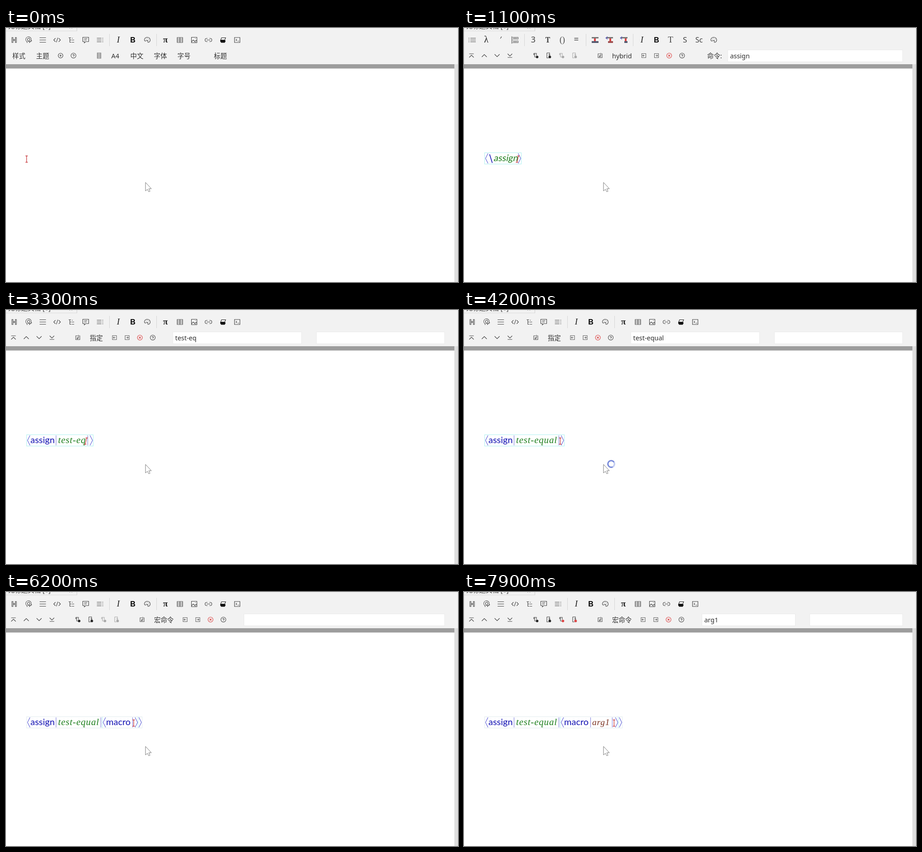
These frames come from a looping animation (998x561 px, 8 s). An HTML page with a canvas:

```html
<!DOCTYPE html>
<html lang="zh">
<meta charset="utf-8">
<style>
  html, body { margin: 0; width: 100%; height: 100%; overflow: hidden; background: #fff }
  canvas { display: block }
</style>
<canvas id="stage" width="998" height="561"></canvas>
<script>
const ctx = document.getElementById('stage').getContext('2d');
const INK = '#444', RED = '#dc4444', PALE = '#a8a8a8', BRACKET = '#5c5cd6', BLUE = '#1414b4', GREEN = '#208020';
const UI = '14.4px "Noto Sans", "Noto Sans CJK SC", sans-serif';
const SANS = '20px Lato, sans-serif';
const serif = (size, style = '') => `${style} ${size}px "Liberation Serif", serif`;

const EMPTY = 0, COMMAND = 1, NAME = 2, BODY = 3, SUBCOMMAND = 4, MACRO = 5, MACRO_ARG = 6;

// Typing steps: time in ms, editor mode, text typed so far.
const steps = [
  [0, EMPTY, ''],
  [500, COMMAND, ''], [600, COMMAND, 'a'], [700, COMMAND, 'as'], [800, COMMAND, 'ass'], [900, COMMAND, 'assi'], [1000, COMMAND, 'assign'],
  [1500, NAME, ''], [1900, NAME, 't'], [2000, NAME, 'te'], [2200, NAME, 'tet'], [2300, NAME, 'te'], [2400, NAME, 'tes'], [2600, NAME, 'test'],
  [2900, NAME, 'test-'], [3100, NAME, 'test-e'], [3200, NAME, 'test-eq'], [3400, NAME, 'test-equ'], [3500, NAME, 'test-equa'], [3600, NAME, 'test-equal'],
  [3900, BODY, ''],
  [4600, SUBCOMMAND, ''], [4800, SUBCOMMAND, 'm'], [4900, SUBCOMMAND, 'ma'], [5000, SUBCOMMAND, 'mac'], [5200, SUBCOMMAND, 'macr'], [5300, SUBCOMMAND, 'macro'],
  [5800, MACRO, ''], [6500, MACRO, 'a'], [6700, MACRO, 'ar'], [6800, MACRO, 'arg'], [7000, MACRO, 'arg1'],
  [7600, MACRO_ARG, 'arg1']
];
const stateAt = t => steps.findLast(s => s[0] <= Math.max(t, 0));

// Icon outlines, centred on the origin.
const icons = {
  heading: 'M-5-5.5V5.5H-2.5V-5.5ZM2.5-5.5V5.5H5V-5.5ZM-2.5-1H2.5M-2.5 1H2.5',
  head: 'M-3 6.5V4A6 6 0 1 1 6 0L7 2H5V4H2V6.5M-1 3V1A2.7 2.7 0 1 1 2 1V3Z',
  lines: 'M-7-5H7M-7 0H7M-7 5H7',
  code: 'M-3.5-4L-7.5 0L-3.5 4M3.5-4L7.5 0L3.5 4M1.5-5L-1.5 5',
  tree: 'M-6-5H-1M-3.5-5V5H0M-3.5 0H0M1-4H3M1 0H6M1 5H6',
  note: 'M-6.5-6H6.5V3.5H0L-3 6.5V3.5H-6.5ZM-3.5-3H3.5M-3.5 0H2',
  leaders: 'M-7-4H3M-7 0H3M-7 4H3M5-4H7M5 0H7M5 4H7',
  palette: 'M-6-1A6.3 6 0 0 1 1 -6A6.3 6 0 0 1 4 5C1 6 1 4 2 2C2 0-1 1-3 2C-5 3-6 1-6-1M-3-2h1M0-4h1M3-2h1',
  table: 'M-6-5.5H6V5.5H-6ZM-6-2H6M-6 2H6M0-5.5V5.5',
  image: 'M-6-6H6V6H-6ZM-6 4L-2 0L3 5M1 3L4 1L6 3M2-3h1.5',
  link: 'M-2 3.5H-4A3.5 3.5 0 0 1-4-3.5H-2M2-3.5H4A3.5 3.5 0 0 1 4 3.5H2M-4 0H4',
  terminal: 'M-6-5.5H6V5.5H-6ZM-3-2L-1 0L-3 2M1 2.5H4',
  bullets: 'M-8-4h2M-8 0h2M-8 4h2M-4-4H8M-4 0H8M-4 4H8',
  boxed: 'M-7-8V8M-7-6H7V-2H-7M-7 2H7V6H-7M-4-4H5M-4 4H5',
  first: 'M-5-4H5M-5 4L0-1L5 4',
  up: 'M-5.5 3L0-2.5L5.5 3',
  down: 'M-5.5-3L0 2.5L5.5-3',
  last: 'M-5 4H5M-5-4L0 1L5-4',
  insertRow: 'M-5-5H1V0M-3-5V3H0M-5-5V-2H-3',
  insertCol: 'M-4-6H2V-2M-4-6V5H0M0-3L3-1L0 1',
  context: 'M0-4H-4.5V4.5H4.5V-4H3M1.5-6V1.5H-2M0-.5L-2 1.5L0 3.5',
  before: 'M-4.5-5H4.5V4H-4.5ZM2-.5H-2.5M-.5-2.5L-2.5-.5L-.5 1.5',
  after: 'M-4.5-5H4.5V4H-4.5ZM-2-.5H2.5M.5-2.5L2.5-.5L.5 1.5',
  cross: 'M-5.5 0A5.5 5.5 0 1 1 5.5 0A5.5 5.5 0 1 1-5.5 0M-2-2L2 2M2-2L-2 2',
  plus: 'M-5.2 0A5.2 5.2 0 1 1 5.2 0A5.2 5.2 0 1 1-5.2 0M-2.5 0H2.5M0-2.5V2.5',
  help: 'M-5.5 0A5.5 5.5 0 1 1 5.5 0A5.5 5.5 0 1 1-5.5 0M-1.7-1A1.7 1.7 0 1 1 0 1V1.5M0 2.7V3.5',
  page: 'M-4-6H4V6H-4ZM-4-4H4M-4-2H4M-4 0H4M-4 2H4M-4 4H4'
};

function rect(x, y, w, h, color) {
  ctx.fillStyle = color;
  ctx.fillRect(x, y, w, h);
}
function frame(left, right, color) {
  ctx.strokeStyle = color;
  ctx.lineWidth = 1;
  ctx.strokeRect(left + .5, 275.5, right - left - 1, 25);
}
function stroke(path, color, width = 1.1) {
  ctx.strokeStyle = color;
  ctx.lineWidth = width;
  ctx.stroke(new Path2D(path));
}
function icon(name, x, y, color = INK) {
  ctx.save();
  ctx.translate(x, y);
  stroke(icons[name], color);
  ctx.restore();
}
function text(s, x, y, font = UI, color = '#303030', align = 'left') {
  ctx.font = font;
  ctx.fillStyle = color;
  ctx.textAlign = align;
  ctx.fillText(s, x, y);
  return x + ctx.measureText(s).width;
}
function spaced(s, x, size, color) {
  ctx.letterSpacing = '.8px';
  const end = text(s, x, 294, serif(size, 'italic'), color);
  ctx.letterSpacing = '0px';
  return end;
}
const glyph = (s, x, font, color = INK) => text(s, x, 32, font, color, 'center');
const divider = x => rect(x, 13, 1, 27, '#d6d6d6');

function styleButtons(x) {
  glyph('I', x, serif(19, 'italic'), '#222');
  glyph('B', x + 32, 'bold 16px "Liberation Sans", sans-serif', '#000');
}

function textTools() {
  ['heading', 'head', 'lines', 'code', 'tree', 'note', 'leaders']
    .forEach((n, i) => icon(n, 18 + i * 31.6, 26.5));
  divider(228);
  styleButtons(248);
  icon('palette', 311.5, 26.5);
  divider(332);
  glyph('π', 352, 'bold 19px "Liberation Serif", serif', '#222');
  ['table', 'image', 'link'].forEach((n, i) => icon(n, 384 + i * 31.5, 26.5));
  ctx.save();
  ctx.translate(479, 26.5);
  ctx.fillStyle = '#111';
  ctx.fill(new Path2D('M-6 0H4L6 2L4 6H-4L-6 3Z'));
  stroke('M-3-5H6L4 0H-5Z', '#222');
  ctx.restore();
  icon('terminal', 510.5, 26.5);
}

function codeTools() {
  const sans = '18px "Noto Sans", sans-serif';
  icon('bullets', 18, 26.5);
  glyph('λ', 49, serif(20), '#222');
  glyph('′', 81, sans);
  icon('boxed', 112.5, 26.5, '#666');
  divider(133);
  glyph('3', 153, sans);
  glyph('T', 185, 'bold 16px "Noto Serif", serif');
  glyph('()', 217, serif(18));
  glyph('=', 248, '19px "Noto Sans", sans-serif');
  divider(269);
  [289, 321, 353].forEach((x, i) => {
    rect(x - 7, 20, 15, 3, '#777');
    rect(x - 2 + i * 2, 23, 4, 6, RED);
    rect(x - 7 + i * 4, 29, 15 - i * 4, 4, i == 1 ? '#a05050' : '#555a70');
    if (i) stroke(`M${x - 4} 19l-4 3l4 3`, '#5555c8');
  });
  divider(373);
  styleButtons(393);
  glyph('T', 456, serif(19));
  glyph('S', 488, '17px "Noto Sans", sans-serif');
  glyph('Sc', 519, '16px "Noto Sans", sans-serif');
  icon('palette', 551, 26.5);
}

function field(left, right, s = '') {
  rect(left, 48, right - left, 27, '#ebebeb');
  rect(left + 1, 49, right - left - 2, 25, '#fff');
  text(s, left + 5.5, 66.5);
}
function insertTools(removeColor) {
  [159, 187, 216, 244].forEach((x, i) => {
    const body = i > 1 && removeColor == PALE ? PALE : INK;
    icon(i % 2 ? 'insertCol' : 'insertRow', x, 61, body);
    ctx.fillStyle = i > 1 ? removeColor : '#222';
    ctx.beginPath();
    ctx.arc(x + 2.5, 64, 2.8, 0, 7);
    ctx.fill();
  });
}
function contextTools(x, label, after) {
  icon('context', x, 61, '#555');
  text(label, x + 26.5, 67);
  icon('before', after + .5, 61.5, '#666');
  icon('after', after + 28.5, 61.5, '#666');
  icon('cross', after + 56.6, 61, RED);
  icon('help', after + 85, 61);
}

function toolbar([, mode, s]) {
  const command = mode == COMMAND || mode == SUBCOMMAND;
  command ? codeTools() : textTools();
  if (mode == EMPTY) {
    [['样式', 14], ['主题', 66.5], ['A4', 232.5], ['中文', 274.5], ['字体', 326.5], ['字号', 378.5], ['标题', 459]]
      .forEach(([label, x]) => text(label, x, 67));
    icon('plus', 120.5, 61);
    icon('help', 149, 61);
    icon('page', 205.5, 61, '#777');
    return;
  }
  ['first', 'up', 'down', 'last'].forEach((n, i) => icon(n, 16.5 + i * 28.3, 61));
  if (command) {
    insertTools(PALE);
    contextTools(300.5, 'hybrid', 396.5);
    text('命令:', 537, 67);
    field(582, 969, s);
  } else if (mode == NAME || mode == BODY) {
    contextTools(158.5, '指定', 239);
    field(368, 653, mode == BODY ? 'test-equal' : s);
    field(685, 969);
  } else {
    insertTools(mode == MACRO_ARG ? RED : PALE);
    contextTools(300.5, '宏命令', 395);
    field(525, mode == MACRO_ARG ? 732 : 969, s);
    if (mode == MACRO_ARG) field(763, 969);
  }
}

const open = x => stroke(`M${x + 5.5} 277L${x} 288L${x + 5.5} 299`, BRACKET);
const close = x => stroke(`M${x} 277L${x + 5.5} 288L${x} 299`, BRACKET);
const bar = x => stroke(`M${x} 277V299`, '#8484dc');

function caret(x, lean = 0) {
  ctx.save();
  ctx.translate(x, 289.5);
  ctx.transform(1, 0, -lean, 1, 0, 0);
  stroke('M-2.5-7H2.5M0-7V7M-2.5 7H2.5', '#c83c40', 1.3);
  ctx.restore();
}

// Each part returns its right edge.
function command(x, s) {
  open(x + 2.5);
  stroke(`M${x + 11.5} 279L${x + 17.5} 298`, BLUE, 1.6);
  ctx.save();
  ctx.translate(x + 20, 294);
  ctx.transform(1, 0, -.2, 1, 0, 0);
  const end = x + 20 + text(s, 0, 0, SANS, GREEN);
  ctx.restore();
  close(end + 1);
  caret(end, .25);
  frame(x, Math.round(end + 8), '#aef0f0');
  return end + 8;
}
function macro(x, s, hasArg) {
  open(x + 2.5);
  text('macro', x + 9, 294, SANS, BLUE);
  bar(x + 67.5);
  let end = x + 71;
  if (hasArg) {
    const sep = spaced(s, end, 19.5, '#7c3424') + 5;
    bar(sep);
    end = sep + 5;
  } else if (s) end = text(s, end, 294, serif(20), '#111');
  caret(end - 1);
  close(end + 2);
  frame(x, Math.round(end + 8.5), '#aef0f0');
  return end + 8.5;
}
function assign(mode, s) {
  open(47.5);
  text('assign', 54, 294, SANS, BLUE);
  bar(110.5);
  const end = spaced(mode == NAME ? s : 'test-equal', 115, 21, GREEN);
  const sep = Math.round(end + 3.5) + .5;
  bar(sep);
  let right = sep + 3;
  if (mode == NAME) caret(end, .25);
  if (mode == BODY) caret(sep + 3);
  if (mode == SUBCOMMAND) right = command(sep + 2.5, s);
  if (mode >= MACRO) right = macro(sep + 2.5, s, mode == MACRO_ARG);
  close(right + 2);
  frame(45, Math.round(right + 9), mode <= BODY ? '#aef0f0' : '#e2ebef');
}
function editor([, mode, s]) {
  if (mode == EMPTY) caret(45.5);
  else if (mode == COMMAND) command(45, s);
  else assign(mode, s);
}

function pointer(t) {
  const arrow = new Path2D('M308 341V360L312.3 356.3L315.2 361.8L318 360.5L315.3 355H321Z');
  ctx.fillStyle = '#fff';
  ctx.fill(arrow);
  ctx.strokeStyle = '#777';
  ctx.lineWidth = 1;
  ctx.stroke(arrow);
  if (t < 4000 || t >= 4500) return;
  const ring = (from, to, color, width) => {
    ctx.beginPath();
    ctx.arc(325, 340, 7.3, from, to);
    ctx.strokeStyle = color;
    ctx.lineWidth = width;
    ctx.stroke();
  };
  const turn = t / 160;
  ring(0, 7, '#c3cdf2', 3.6);
  ring(turn, turn + 4.6, '#7788d8', 2.6);
}

function draw(now) {
  const t = Math.floor(now % 8000 / 100) * 100;
  rect(0, 0, 998, 561, '#fff');
  rect(0, 0, 998, 80, '#f2f2f2');
  text('无标题文档 [1]', 5, 1, UI, '#444');
  text('×', 139, 3, UI, '#777');
  rect(0, 6, 157, 1, '#dadada');
  rect(156, 0, 1, 7, '#cecece');
  rect(0, 80, 990, 9.5, '#9d9d9d');
  rect(990, 80, 8, 481, '#dedede');
  toolbar(stateAt(t - 100)); // the toolbar trails the editor by one step
  editor(stateAt(t));
  pointer(t);
  requestAnimationFrame(draw);
}
requestAnimationFrame(draw);
</script>
</html>
```
